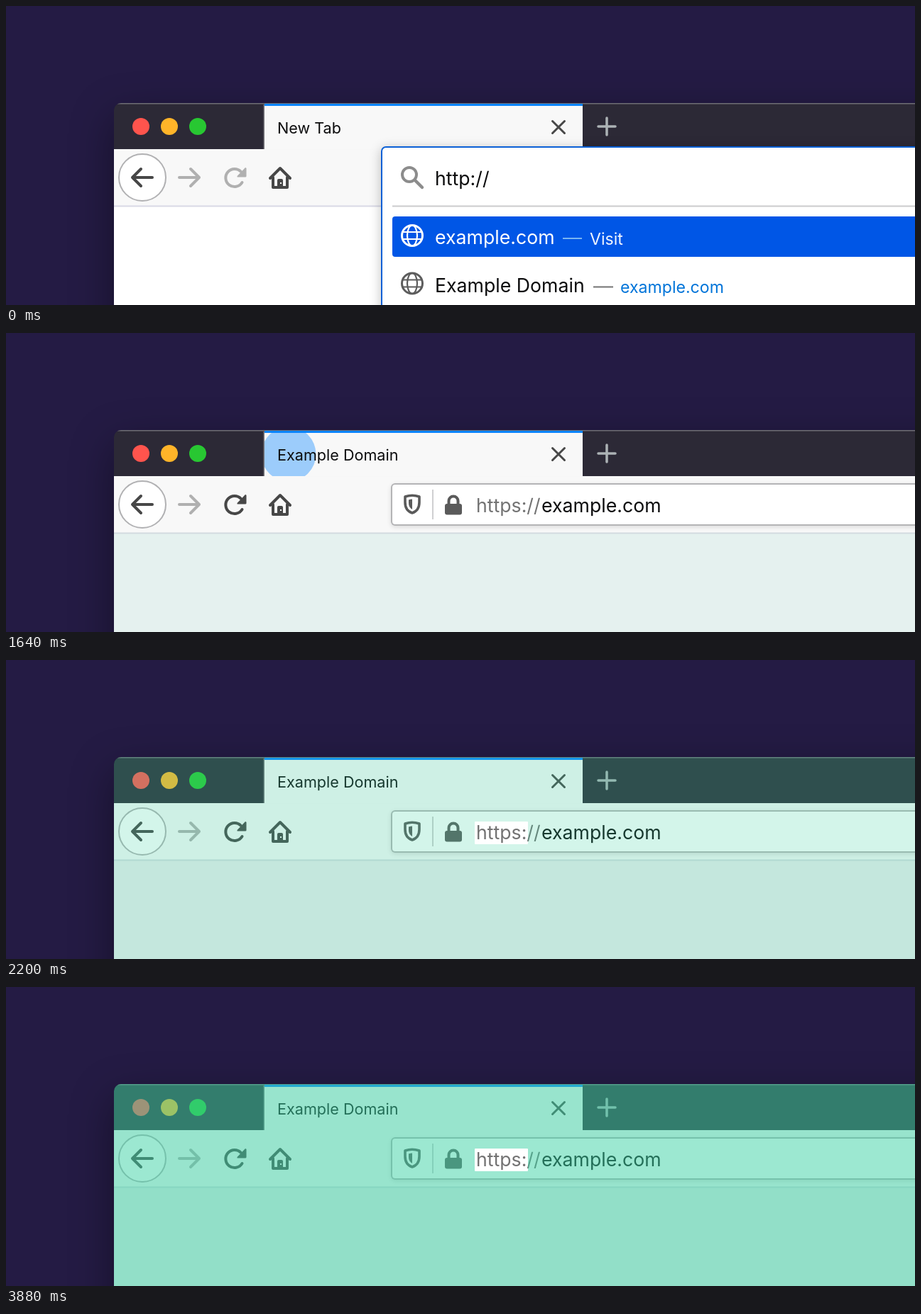
These frames come from a looping animation (1280 px wide and 422 px high, 4.52 s). An HTML page with a canvas:

```html
<!DOCTYPE html>
<html lang="en">
<head>
<meta charset="utf-8">
<title>Address bar</title>
<style>
  html, body { margin: 0; width: 100%; height: 100%; overflow: hidden; background: #241b44; }
  canvas { display: block; }
</style>
</head>
<body>
<canvas width="1280" height="422"></canvas>
<script>
const ctx = document.querySelector('canvas').getContext('2d');
const LOOP = 4520, STEP = 40;
const KEY_TIMES = [40, 160, 240, 360, 440, 560, 640, 720, 760, 840, 920];
const LOADED = 1640;
const BURST = { start: 1632, length: 375 };
const TINT = { start: 2066, length: 300 };
const DARK = '#474747', PALE = '#b0b0b0';

const clamp = v => Math.max(0, Math.min(1, v));

function rect(x, y, w, h, color, radius = 0) {
  ctx.fillStyle = color;
  ctx.beginPath();
  ctx.roundRect(x, y, w, h, radius);
  ctx.fill();
}

function disc(x, y, r, color) {
  ctx.fillStyle = color;
  ctx.beginPath();
  ctx.arc(x, y, r, 0, 7);
  ctx.fill();
}

function stroke(path, color, width = 4) {
  ctx.strokeStyle = color;
  ctx.lineWidth = width;
  ctx.stroke(new Path2D(path));
}

function fill(path, color) {
  ctx.fillStyle = color;
  ctx.fill(new Path2D(path));
}

function ring(x, y, rx, ry, color, width) {
  ctx.strokeStyle = color;
  ctx.lineWidth = width;
  ctx.beginPath();
  ctx.ellipse(x, y, rx, ry, 0, 0, 7);
  ctx.stroke();
}

function setSize(size) {
  ctx.font = `${size}px Inter, sans-serif`;
}

function text(string, x, y, color, size = 26.7) {
  setSize(size);
  ctx.fillStyle = color;
  ctx.fillText(string, x, y);
}

function withShadow(blur, offset, color, draw) {
  ctx.save();
  ctx.shadowBlur = blur;
  ctx.shadowOffsetY = offset;
  ctx.shadowColor = color;
  draw();
  ctx.restore();
}

function globe(x, y, color) {
  ring(x, y, 14.5, 14.5, color, 3);
  ring(x, y, 7, 14.5, color, 2.2);
  stroke(`M${x - 13} ${y - 5}h26M${x - 13} ${y + 5}h26`, color, 2.2);
}

function drawBurst(t) {
  const x = (t - BURST.start) / BURST.length;
  if (x <= 0 || x >= 1) return;
  const p = 1 - (1 - x) ** 1.7;
  ctx.save();
  ctx.beginPath();
  ctx.rect(364, 141, 448, 61);
  ctx.clip();
  disc(398, 171, 16 * (1 + 39 * p), `rgba(10,132,255,${0.4 * (1 - p)})`);
  ctx.restore();
}

function drawWindow(t, loaded, tinted) {
  const page = !loaded ? '#fff' : tinted ? '#ecedee' : '#e5f1ef';
  withShadow(60, 20, 'rgba(0,0,0,.4)', () => rect(152, 137, 1200, 400, '#2c2936', 10));

  ctx.save();
  ctx.beginPath();
  ctx.roundRect(152, 137, 1200, 400, 10);
  ctx.clip();
  rect(152, 137, 1128, 1.5, '#6f6e75');
  rect(152, 202, 1128, 80, '#f8f8f8');
  rect(152, 282, 1128, 140, page);
  rect(152, 281.5, 1128, 2, loaded ? '#d3dbe0' : '#d9d9e6');
  ctx.restore();

  ['#ff544d', '#ffb429', '#28c732'].forEach((color, i) => disc(190 + 40 * i, 170, 12, color));

  rect(362.5, 139, 1.5, 63, '#77767c');
  rect(364, 138, 448, 64.5, '#f8f8f8');
  drawBurst(t);
  rect(364, 138, 448, 3, '#0a84ff');
  text(loaded ? 'Example Domain' : 'New Tab', 382, 180, '#0c0c0d', 21.6);
  stroke('M769.5 162.5l17 17m0-17l-17 17', DARK, 3);
  stroke('M834 170h24M846 158v24', '#acb2b5', 3.5);

  disc(192, 242, 33, '#fff');
  ring(192, 242, 33, 33, '#b1b1b3', 2);
  stroke('M178 242h28M190 230l-12 12l12 12', DARK);
  stroke('M244 242h28M260 230l12 12l-12 12', PALE);

  const reload = loaded ? DARK : PALE;
  stroke('M332.5 249A12.5 12.5 0 1 1 331 234', reload);
  fill('M337 228q1.5 0 1.5 1.5V240q0 1.5-1.5 1.5H326.500q-2 0-.5-2z', reload);

  stroke('M372 243l14-14l14 14M376 242v14h20v-14', DARK);
  fill('M382 256v-10q0-2 2-2h4q2 0 2 2v10z', DARK);
  rect(386, 249, 2, 2, '#f8f8f8');
}

function drawPopup(t) {
  withShadow(16, 3, 'rgba(0,0,0,.25)', () => rect(528, 198, 900, 400, '#0a60d6', 7));
  rect(530, 200, 900, 400, '#fff', 5);

  ring(568, 238, 10, 10, '#8c8c8c', 4);
  stroke('M576 246l10 10', '#8c8c8c', 4.5);

  const typed = KEY_TIMES.filter(k => k <= t).length;
  const url = typed ? 'http://example.com/' : 'http://';
  if (typed) {
    setSize(26.7);
    const from = 604 + ctx.measureText(url.slice(0, 7 + typed)).width;
    const to = 604 + ctx.measureText(url).width;
    rect(from, 227, to - from, 32, '#a8d1ff');
  }
  text(url, 604, 252.5, '#0c0c0d');
  rect(544, 281.5, 736, 2, '#cbcbcd');

  rect(544, 297, 800, 57, '#0056e6', 4);
  globe(572, 324, '#fff');
  text('example.com', 604, 336, '#fff');
  rect(784, 327, 27, 2, '#79b4f2');
  text('Visit', 822, 337, '#f0f6ff', 23.1);

  globe(572, 391.5, '#5c5c5c');
  text('Example Domain', 604, 404, '#0c0c0d');
  rect(827, 395.5, 28, 2, '#737373');
  text('example.com', 865, 405, '#0074d9', 23.1);
}

function drawField() {
  withShadow(6, 2, 'rgba(0,0,0,.12)', () => rect(542, 212, 900, 60, '#b4b4b6', 6));
  rect(544, 214, 900, 56, '#fff', 4);
  stroke('M562 231q10-3.500 20 0v8c0 8-4 13-10 15c-6-2-10-7-10-15z', '#5a5a5a', 3.6);
  fill('M567 235.500q2.500-1 5-1v14.500c-3.500-2-5-5-5-9z', '#5a5a5a');
  rect(600, 221, 2, 42, '#cfcfd1');
  rect(618, 241, 24, 15.5, '#5a5a5a', 3);
  stroke('M623.500 242v-5a6.500 6.500 0 0 1 13 0v5', '#5a5a5a');
  text('https://', 662, 252.5, '#737373');
  text('example.com', 754, 252.5, '#0c0c0d');
}

function drawTint(amount) {
  ctx.fillStyle = `rgba(58,210,163,${0.5 * amount})`;
  ctx.beginPath();
  ctx.roundRect(152, 137, 1200, 400, 10);
  ctx.roundRect(660, 228, 75, 32, 1);
  ctx.fill('evenodd');
}

function draw(t) {
  const loaded = t >= LOADED;
  const tint = clamp((t - TINT.start) / TINT.length);
  rect(0, 0, 1280, 422, '#241b44');
  drawWindow(t, loaded, tint > 0);
  if (loaded) drawField();
  else drawPopup(t);
  if (tint) drawTint(tint);
}

ctx.lineCap = ctx.lineJoin = 'round';
const begin = performance.now();
function tick() {
  const t = (performance.now() - begin) % LOOP;
  draw(Math.floor(t / STEP) * STEP);
  requestAnimationFrame(tick);
}
tick();
</script>
</body>
</html>
```
